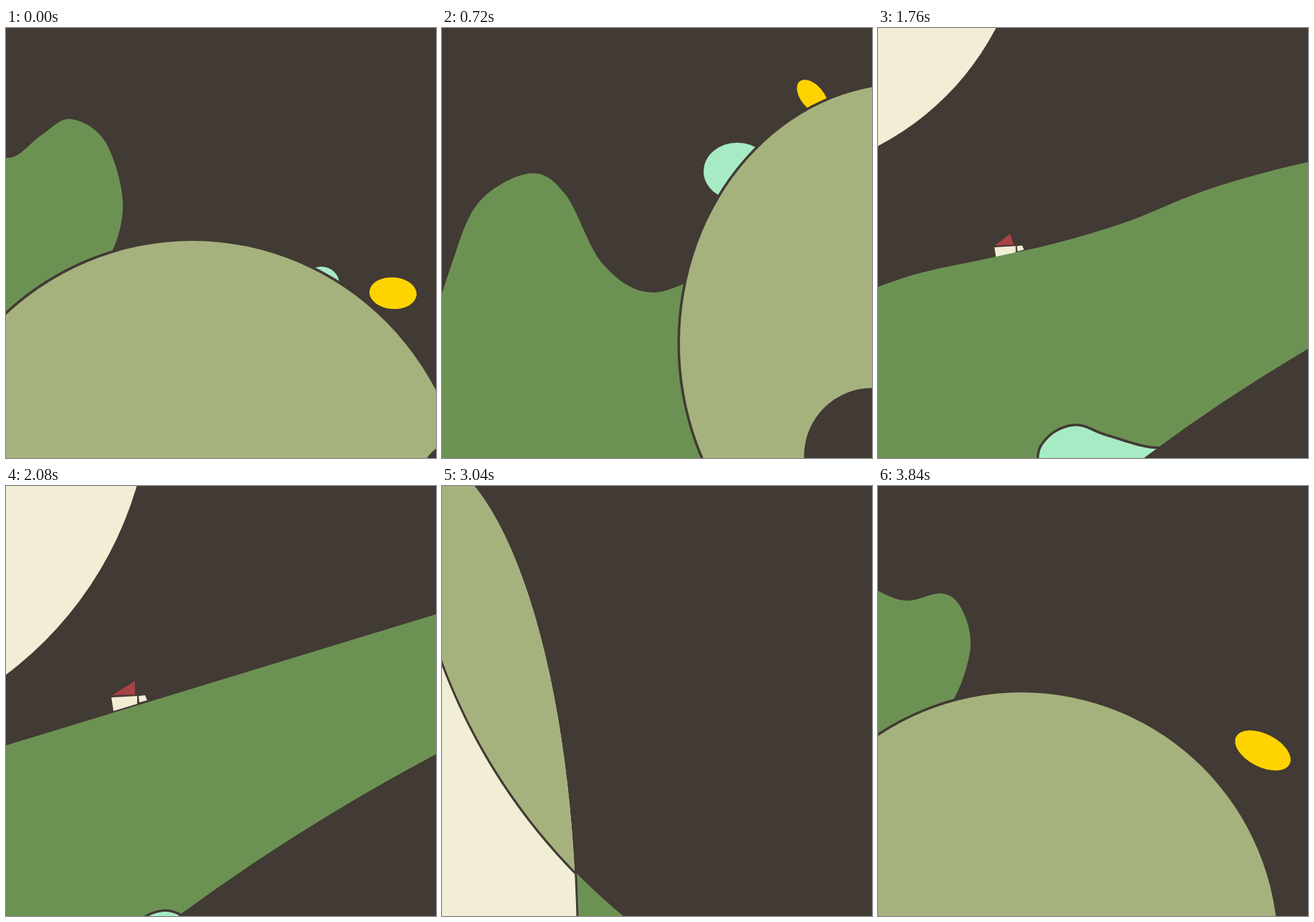
Recreate the animation shown at these times as an HTML page with a canvas. Size 600x600 px, loop 3.92 s.

```html
<!DOCTYPE html>
<html lang="en">
<head>
<meta charset="utf-8">
<title>Rolling hills</title>
<style>
  html, body { margin: 0; width: 100%; height: 100%; overflow: hidden; background: #423a34; }
  canvas { display: block; }
</style>
</head>
<body>
<canvas id="stage" width="600" height="600"></canvas>
<script>
const ctx = document.getElementById('stage').getContext('2d');
const LOOP = 3920, STEP = 80, SEAM = 3600;
const DARK = '#423a34', GREEN = '#6c9253', OLIVE = '#a6b27d', CREAM = '#f2edd5',
      MINT = '#a7ebc4', YELLOW = '#ffd300', RED = '#a64345';

// Poses are [time, ...values] and are joined by smooth easing.

// The great disc (cx, cy, rx, ry) lives for nearly two loops.
const disc = [
  [1100, -250, -400, 250, 250],
  [1360, -88, -227, 280, 280],
  [2080, -305, -143, 508, 508],
  [2480, -495, -45, 735, 735],
  [3040, -39, 650, 227, 700],
  [3840, 200, 646, 358, 358],
  [3920, 260, 690, 385, 393],
  [4640, 650, 440, 318, 362],
  [5280, 1237, -515, 1060, 1060],
  [5760, 2000, -1200, 1060, 1060]
];

// The dark hole: a point on its rim, inward angle in degrees, radius.
const hole = [
  [-80, 640, 640, 45, 50],
  [0, 594, 592, 45, 60],
  [720, 533, 530, 45, 95],
  [1360, 535, 549, 53, 1500],
  [2080, 420, 478, 58, 2900],
  [2480, 215, 454, 31.4, 1220],
  [3040, 79, 403, -32.4, 838],
  [3600, -300, 900, -45, 1600]
];

// The green land: a bush that spreads into a wavy slope, then a straight one.
const slope = (y, k, wave = 0) => Array.from({ length: 8 }, (_, i) => i * 100 - 50)
  .flatMap(x => [x, y + k * x + wave * Math.cos((x - 285) / 70)]);
const bush = [-30, 122, 0, 146, 40, 160, 90, 150, 117, 172, 129, 225, 107, 295, 70, 330];
const land = [
  [-400, ...bush.map((v, i) => i % 2 ? v + 10 : v - 170)],
  [-80, ...bush],
  [0, -30, 175, 10, 180, 50, 149, 90, 127, 138, 158, 163, 242, 147, 314, 110, 350],
  [720, -20, 440, 10, 340, 50, 245, 122, 203, 172, 232, 225, 330, 297, 369, 400, 325],
  [1360, ...slope(369, -0.255, 16)],
  [2080, ...slope(362, -0.305)],
  [2480, ...slope(203, 0.377)],
  [3040, ...slope(220, 0.8)]
];

// The lake and the house keep their shape; their place is keyed.
const pond = [-51, 54, -38, 17, 0, 0, 45, 15, 115, 32, 180, 17, 250, 29, 150, 219, -30, 149];
const lake = [[720, 500, 750], [1360, 350, 531], [2080, 222, 594], [2480, 160, 680]];

const wall = [-17, 3, 19, 1, 19, 12, -14, 22];
const annex = [21, 1, 30, 0, 33, 7, 22, 10];
// x, y, scale, roof tip
const house = [
  [1200, 196, 360, 0.58, 0],
  [1360, 188, 320, 0.58, 0],
  [2080, 164, 292, 1, 16],
  [2480, 85, 262, 1, 16]
];

// Small moons: cx, cy, rx, ry, tilt in degrees.
const moon = [
  [-80, 470, 445, 20, 20, 0],
  [0, 440, 357, 25, 24, 0],
  [720, 412, 200, 47, 40, 0],
  [1360, 230, -90, 45, 40, 0]
];
const spark = [
  [-400, 680, 410, 44, 24, 30],
  [-80, 537, 369, 42, 23, 27],
  [0, 540, 370, 33, 22, 4],
  [720, 517, 96, 28, 16, 50],
  [1440, 280, -40, 18, 16, 80]
];

// Smooth interpolation through the poses without overshoot.
function at(keys, t) {
  const last = keys.length - 1;
  if (t <= keys[0][0]) return keys[0].slice(1);
  if (t >= keys[last][0]) return keys[last].slice(1);
  const k = keys.findIndex(key => key[0] > t) - 1;
  const span = keys[k + 1][0] - keys[k][0], u = (t - keys[k][0]) / span, w = 1 - u;
  const rate = (n, i) => n < 0 || n >= last ? 0 :
    (keys[n + 1][i] - keys[n][i]) / (keys[n + 1][0] - keys[n][0]);
  const tangent = (n, i) => {
    const a = rate(n - 1, i), b = rate(n, i);
    return a * b > 0 ? 2 * a * b / (a + b) : 0;
  };
  return keys[k].slice(1).map((a, j) => {
    const i = j + 1, b = keys[k + 1][i];
    return a * w * w * (1 + 2 * u) + b * u * u * (3 - 2 * u)
      + span * u * w * (w * tangent(k, i) - u * tangent(k + 1, i));
  });
}

function ellipse([x, y, rx, ry, tilt = 0]) {
  const path = new Path2D();
  path.ellipse(x, y, rx, ry, tilt * Math.PI / 180, 0, 2 * Math.PI);
  return path;
}

function rimCircle([x, y, angle, r]) {
  const a = angle * Math.PI / 180;
  return ellipse([x + r * Math.cos(a), y + r * Math.sin(a), r, r]);
}

function polygon(p) {
  const path = new Path2D();
  for (let i = 0; i < p.length; i += 2) path.lineTo(p[i], p[i + 1]);
  path.closePath();
  return path;
}

function spline(p, closed) {
  const path = new Path2D(), n = p.length / 2;
  const pt = i => {
    const k = closed ? (i + n) % n : Math.min(Math.max(i, 0), n - 1);
    return [p[2 * k], p[2 * k + 1]];
  };
  path.moveTo(...pt(0));
  for (let i = 0; i < (closed ? n : n - 1); i++) {
    const [a, b, c, d] = [pt(i - 1), pt(i), pt(i + 1), pt(i + 2)];
    path.bezierCurveTo(b[0] + (c[0] - a[0]) / 6, b[1] + (c[1] - a[1]) / 6,
      c[0] - (d[0] - b[0]) / 6, c[1] - (d[1] - b[1]) / 6, ...c);
  }
  return path;
}

function paint(path, color, outline = 0) {
  if (outline) {
    ctx.strokeStyle = DARK;
    ctx.lineWidth = outline;
    ctx.stroke(path);
  }
  ctx.fillStyle = color;
  ctx.fill(path);
}

function drawHouse([x, y, scale, tip]) {
  ctx.save();
  ctx.translate(x, y);
  ctx.scale(scale, scale);
  paint(polygon([-16, 0, tip, -20, 16, -1]), RED);
  paint(polygon(wall), CREAM);
  paint(polygon(annex), CREAM);
  ctx.restore();
}

function drawLand(ridge) {
  const ground = spline(ridge, false);
  ground.lineTo(ridge[ridge.length - 2], 1400);
  ground.lineTo(ridge[0], 1400);
  paint(ground, GREEN);
}

function draw(t) {
  ctx.fillStyle = DARK;
  ctx.fillRect(0, 0, 600, 600);

  drawHouse(at(house, t));
  drawLand(at(land, t));
  const place = at(lake, t);
  paint(spline(pond.map((v, i) => v + place[i % 2]), true), MINT, 7);
  paint(ellipse(at(moon, t)), MINT);
  paint(ellipse(at(spark, t)), YELLOW);

  paint(ellipse(at(disc, t + LOOP)), OLIVE, 7);
  const pit = rimCircle(at(hole, t));
  paint(pit, DARK);

  // The next disc is cream, and turns olive where the hole passes over it.
  const next = ellipse(at(disc, t));
  paint(next, CREAM, 6);
  ctx.save();
  ctx.clip(next);
  paint(pit, OLIVE, 6);
  ctx.restore();
}

function tick() {
  const t = Math.floor(performance.now() % LOOP / STEP) * STEP;
  draw(t >= SEAM ? t - LOOP : t);
  requestAnimationFrame(tick);
}
tick();
</script>
</body>
</html>
```
